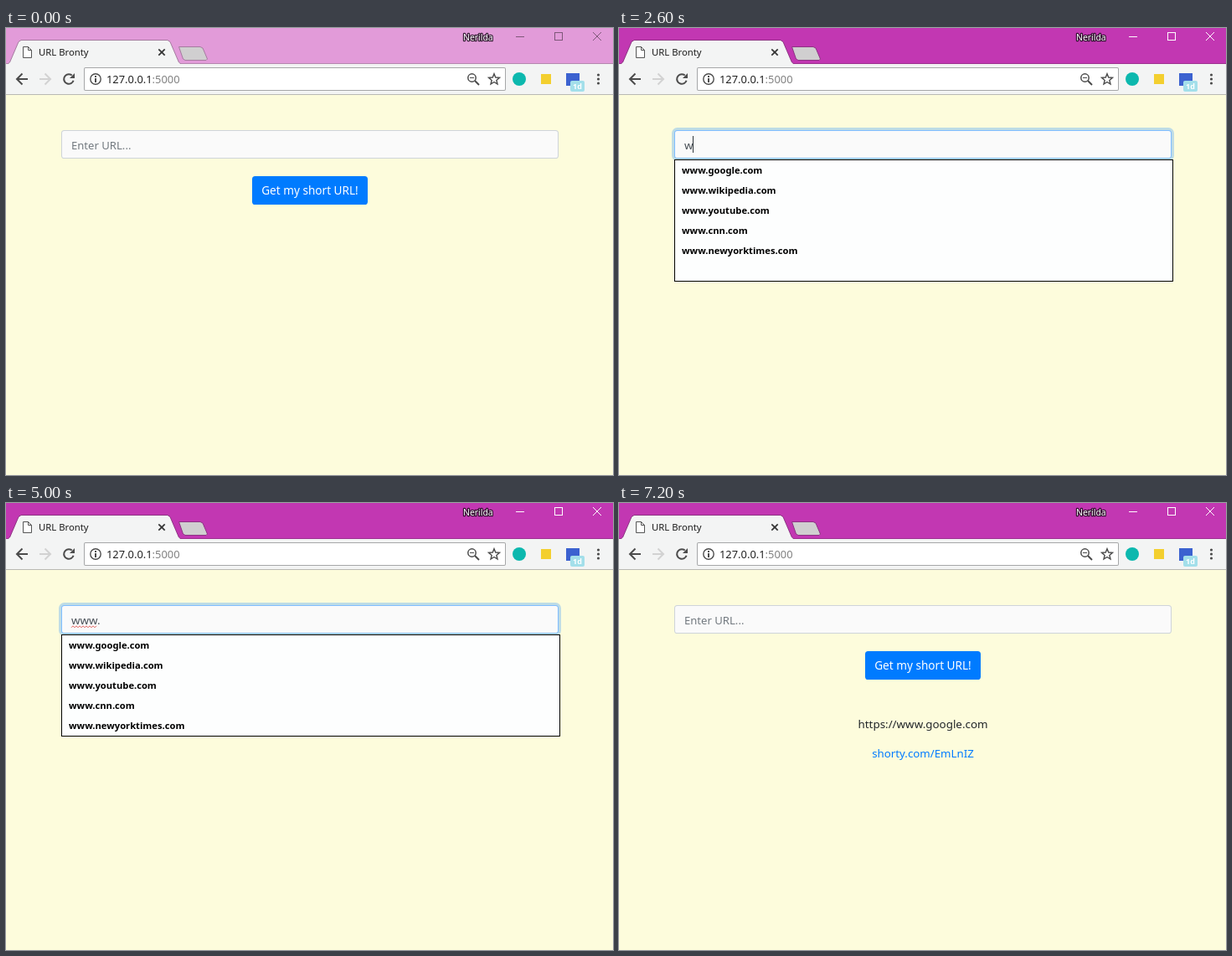
An HTML page with a canvas for the animation above (8000 ms loop, 725 px wide and 534 px high).

```html
<!DOCTYPE html>
<html lang="en">
<head>
<meta charset="utf-8">
<title>URL shortener</title>
<style>
  html, body { margin: 0; width: 100%; height: 100%; overflow: hidden; background: #fdfcdc; }
  canvas { display: block; width: 725px; height: 534px; }
</style>
</head>
<body>
<canvas id="stage"></canvas>
<script>
const W = 725, H = 534, LOOP = 8000;
const FONT = '"Noto Sans", "Open Sans", sans-serif';
const canvas = document.getElementById('stage');
const ctx = canvas.getContext('2d');
const dpr = window.devicePixelRatio || 1;
canvas.width = W * dpr;
canvas.height = H * dpr;

const RECENT = ['www.google.com', 'www.youtube.com', 'google.com',
  'www.wikipedia.com', 'youtube.com', 'lonyeeeeee'];
const SITES = ['www.google.com', 'www.wikipedia.com', 'www.youtube.com',
  'www.cnn.com', 'www.newyorktimes.com'];

// time, typed text, caret shown, dropdown height in rows
const STEPS = [
  [0, '', 0, 0],
  [1800, '', 1, 6],
  [2200, '', 0, 6],
  [2600, 'w', 1, 6],
  [2900, 'ww', 1, 5],
  [3200, 'www', 1, 5],
  [3600, 'www.', 1, 5],
  [4100, 'www.w', 1, 5],
  [4200, 'www.wi', 1, 1],
  [4700, 'www.w', 1, 1],
  [4800, 'www.w', 0, 1],
  [5000, 'www.', 0, 5],
  [5200, 'www.', 1, 5],
  [5700, 'www.g', 1, 5],
  [5800, 'www.g', 1, 1],
  [5900, 'www.go', 1, 1],
  [6000, 'www.goog', 1, 1],
  [6100, 'www.googl', 1, 1],
  [6300, 'www.google', 1, 1],
  [6500, 'www.google.', 1, 1],
  [6600, 'www.google.c', 1, 1],
  [6700, 'www.google.co', 1, 1],
  [6800, 'www.google.com', 1, 1],
  [7100, 'www.google.com', 0, 0],
  [7200, '', 0, 0]
];

function setFont(size, weight = 400) {
  ctx.font = `${weight} ${size}px ${FONT}`;
}

function text(str, x, y, size, color, { weight = 400, align = 'left' } = {}) {
  setFont(size, weight);
  ctx.textAlign = align;
  ctx.fillStyle = color;
  ctx.fillText(str, x, y);
  return ctx.measureText(str).width;
}

function rect(x, y, w, h, color) {
  ctx.fillStyle = color;
  ctx.fillRect(x, y, w, h);
}

function round(x, y, w, h, r, color) {
  ctx.beginPath();
  ctx.roundRect(x, y, w, h, r);
  ctx.fillStyle = color;
  ctx.fill();
}

function trace(points, close) {
  ctx.beginPath();
  points.forEach(([x, y], i) => i ? ctx.lineTo(x, y) : ctx.moveTo(x, y));
  if (close) ctx.closePath();
}

function stroke(color, width = 1) {
  ctx.strokeStyle = color;
  ctx.lineWidth = width;
  ctx.stroke();
}

function line(points, color, width, close) {
  trace(points, close);
  stroke(color, width);
}

function arc(x, y, r, from = 0, to = Math.PI * 2) {
  ctx.beginPath();
  ctx.arc(x, y, r, from, to);
}

function disc(x, y, r, color) {
  arc(x, y, r);
  ctx.fillStyle = color;
  ctx.fill();
}

function cross(x, y, r, color, width) {
  line([[x - r, y - r], [x + r, y + r]], color, width);
  line([[x + r, y - r], [x - r, y + r]], color, width);
}

function drawTitleBar(active) {
  rect(0, 0, W, 43, active ? '#c237b2' : '#e29bd9');
  rect(0, 42, W, 1, active ? '#9c3290' : '#b587af');

  const edge = active ? '#8d3383' : '#a57b9f';
  trace([[206.5, 22.5], [232, 22.5], [235, 24], [240.5, 37], [239, 38.5], [214, 38.5], [211.5, 37]], true);
  ctx.fillStyle = '#d0cfd0';
  ctx.fill();
  stroke(edge);

  const tab = [[2, 43], [4.5, 41], [15, 16.5], [18, 14.5], [193, 14.5], [196, 16.5], [206.5, 41], [209, 43]];
  trace(tab);
  ctx.fillStyle = '#f3f4f4';
  ctx.fill();
  stroke(edge);

  const ink = active ? '#fff' : '#7d5778';
  rect(609, 10, 10, 1, ink);
  ctx.strokeStyle = ink;
  ctx.lineWidth = 1;
  ctx.strokeRect(655.5, 5.5, 9, 9);
  cross(706, 10, 5, ink, 1);

  setFont(10.4);
  ctx.textAlign = 'left';
  ctx.lineJoin = 'round';
  ctx.strokeStyle = 'rgba(30,10,30,.85)';
  ctx.lineWidth = 2.4;
  ctx.strokeText('Nerilda', 546, 15);
  text('Nerilda', 546, 15, 10.4, '#fff');
  ctx.lineJoin = 'miter';
}

function drawTab(loading) {
  if (loading) {
    arc(25.5, 29, 5, -Math.PI * .5, Math.PI * .9);
    stroke('#8c8c8c', 1.6);
  } else {
    trace([[20.5, 22.5], [26.5, 22.5], [30.5, 26.5], [30.5, 35.5], [20.5, 35.5]], true);
    ctx.fillStyle = '#fff';
    ctx.fill();
    stroke('#555');
    line([[26.5, 22.5], [26.5, 26.5], [30.5, 26.5]], '#555', 1);
  }
  text('URL Bronty', 39, 33, 11.3, '#1c1c1c');
  cross(186, 29, 3.7, '#333', 1.7);
}

function arrow(x, dir, color) {
  line([[x - 6 * dir, 61], [x + 7 * dir, 61]], color, 2);
  line([[x + .5 * dir, 54.5], [x - 6 * dir, 61], [x + .5 * dir, 67.5]], color, 2);
}

function drawStar(x, y) {
  const points = [];
  for (let i = 0; i < 10; i++) {
    const a = -Math.PI / 2 + i * Math.PI / 5, r = i % 2 ? 3 : 6.8;
    points.push([x + r * Math.cos(a), y + r * Math.sin(a)]);
  }
  line(points, '#4a4a4a', 1.4, true);
}

function drawToolbar() {
  rect(0, 43, W, 36, '#f3f4f4');
  rect(0, 79, W, 1, '#b9b9b4');
  arrow(19, 1, '#4c4c4c');
  arrow(47, -1, '#d2d2d2');

  arc(75, 61, 5.8, .3, Math.PI * 1.72);
  stroke('#4c4c4c', 2);
  trace([[82, 54], [82, 60], [76, 60]], true);
  ctx.fillStyle = '#4c4c4c';
  ctx.fill();

  round(93, 47, 504, 28, 2, '#a6a7a8');
  round(94, 48, 502, 26, 1, '#fff');
  arc(107, 61, 6.2);
  stroke('#4c4c4c', 1.4);
  rect(106, 60, 2, 5, '#4c4c4c');
  rect(106, 57, 2, 2, '#4c4c4c');
  const host = text('127.0.0.1', 120, 66, 12.9, '#222');
  text(':5000', 120 + host, 66, 12.9, '#808080');

  arc(556.5, 59.5, 4.7);
  stroke('#4a4a4a', 1.5);
  line([[560, 63], [565, 68]], '#4a4a4a', 2);
  line([[554, 59.5], [559, 59.5]], '#4a4a4a', 1);
  drawStar(583, 61.5);

  disc(613, 61, 8, '#0cb8ae');
  rect(639, 55, 12, 12, '#f3cf2f');
  rect(669, 54, 16, 15, '#3c62d0');
  round(674, 63, 17, 13, 2, '#a3dfea');
  text('1d', 682.5, 73, 9, '#fff', { weight: 700, align: 'center' });
  for (const y of [56, 61, 66]) disc(707.5, y, 1.6, '#4c4c4c');
}

function drawSquiggle(x, end) {
  const points = [];
  for (let i = 0; x + i <= end; i += 2) points.push([x + i, i % 4 ? 146.8 : 148.8]);
  line(points, '#e2605c', 1);
}

function drawInput(typed, caret, focus) {
  if (focus) {
    const s = 2.9 * focus;
    round(66 - s, 122 - s, 594 + 2 * s, 34 + 2 * s, 3.6 + s, `rgba(0,123,255,${.25 * focus})`);
  }
  const mix = (a, b) => Math.round(a + (b - a) * focus);
  round(66, 122, 594, 34, 3.6, `rgb(${mix(206, 128)},${mix(212, 189)},${mix(218, 255)})`);
  round(67, 123, 592, 32, 2.6, '#fafafa');

  let width = 0;
  if (typed) {
    width = text(typed, 78, 145, 13.4, '#495057');
    if (typed.length > 3) {
      const flagged = typed.startsWith('www.google.') ? 'www.google' : 'www';
      drawSquiggle(78, 78 + ctx.measureText(flagged).width);
    }
  } else {
    text('Enter URL...', 78, 145, 13.1, '#72797f');
  }
  if (caret) rect(Math.max(78, Math.round(77.3 + width)), 129, 1, 20, '#30363b');
}

function drawList(typed, rows) {
  if (!rows) return;
  rect(66, 157, 596, rows * 24 + 2, '#000');
  rect(67, 158, 594, rows * 24, '#fdfefe');
  const items = typed ? SITES.filter(s => s.startsWith(typed)) : RECENT;
  items.forEach((s, i) => text(s, 75, 174 + i * 24, 11.2, '#000', { weight: 700 }));
}

function draw(t) {
  const [, typed, caret, rows] = STEPS.findLast(s => s[0] <= t);
  const focus = t < 1800 || t >= 7200 ? 0 : t < 1900 ? .6 : 1;

  ctx.setTransform(dpr, 0, 0, dpr, 0, 0);
  rect(0, 0, W, H, '#fdfcdc');
  drawTitleBar(t >= 700);
  drawToolbar();
  drawTab(t >= 7100 && t < 7200);

  drawInput(typed, caret, focus);
  round(294, 177, 138, 34, 3.6, '#007bff');
  text('Get my short URL!', 363, 199, 13.6, '#fff', { align: 'center' });
  drawList(typed, rows);

  if (t >= 7200) {
    text('https://www.google.com', 363, 269, 13.4, '#212529', { align: 'center' });
    text('shorty.com/EmLnIZ', 363, 304, 13.3, '#007bff', { align: 'center' });
  }
}

const start = performance.now();
function tick() {
  draw((performance.now() - start) % LOOP);
  requestAnimationFrame(tick);
}
tick();
</script>
</body>
</html>
```
